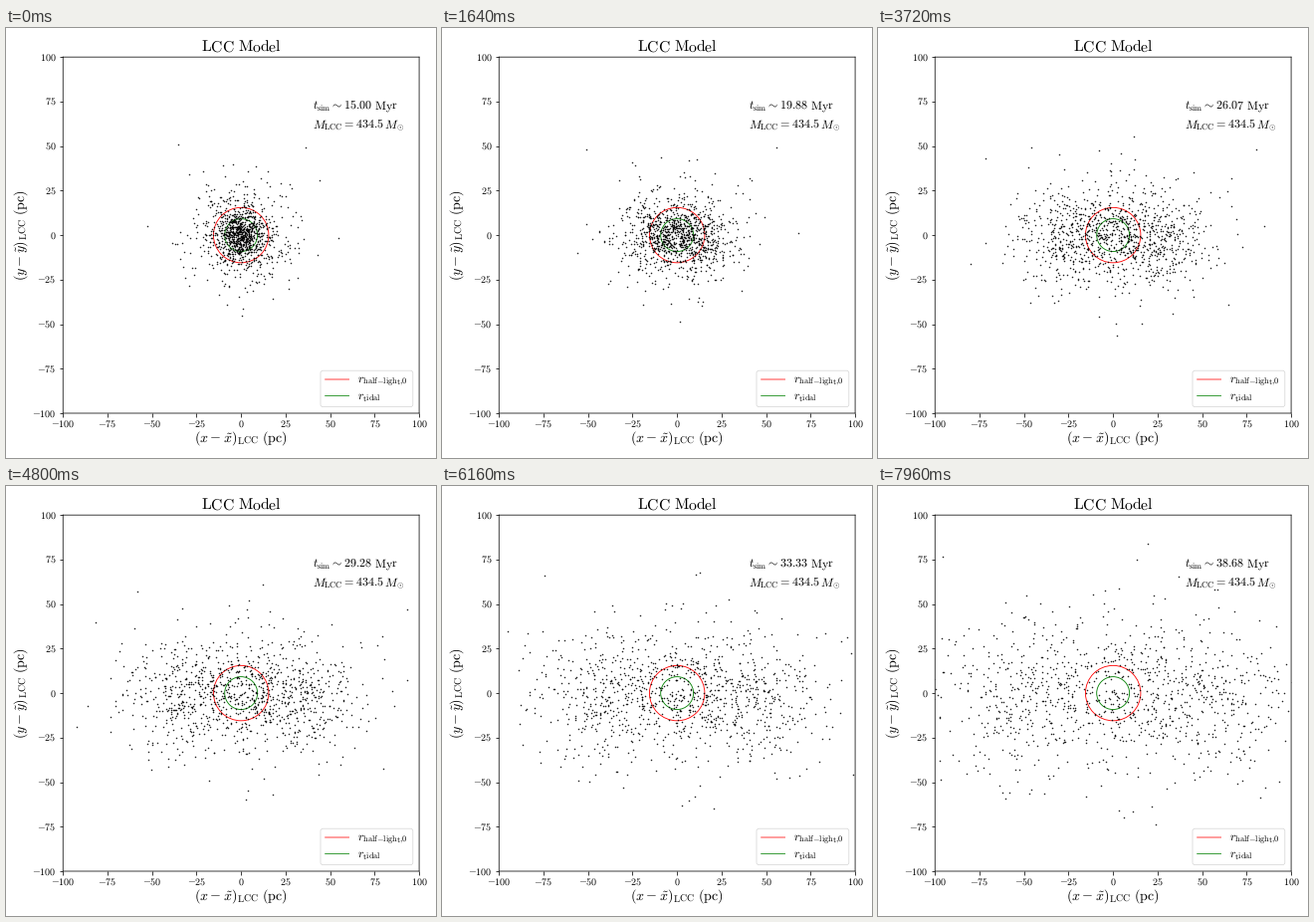
A matplotlib script for the animation above (8000 ms loop, 432 px wide and 432 px high).

```python
import numpy as np
import matplotlib as mpl
import matplotlib.pyplot as plt
from matplotlib.animation import FuncAnimation
from matplotlib.patches import Circle, FancyBboxPatch
from matplotlib.transforms import Affine2D

mpl.rcParams["mathtext.fontset"] = "cm"
mpl.rcParams["text.hinting"] = "none"

SIZE, DPI = 432, 72
FRAMES, INTERVAL = 200, 40
T0, DT = 15.0, 0.119          # Myr
KAPPA = 0.03                  # vertical frequency, 1/Myr
LEFT, TOP, SIDE = 57.24, 29.16, 357.84
MID_X, MID_Y = LEFT + SIDE / 2, TOP + SIDE / 2
HAIR = 0.75                   # thin line width

fig = plt.figure(figsize=(SIZE / DPI, SIZE / DPI), dpi=DPI, facecolor="white")
ax = fig.add_axes([LEFT / SIZE, 1 - (TOP + SIDE) / SIZE,
                   SIDE / SIZE, SIDE / SIZE])
ax.set(xlim=(-100, 100), ylim=(-100, 100))
# Pixel coordinates with y pointing down
px = Affine2D().scale(1 / SIZE, -1 / SIZE).translate(0, 1) + fig.transFigure


def label(x, y, s, size, **kw):
    return ax.text(x, y, f"${s}$", fontsize=size, transform=px,
                   va="baseline", zorder=6, **kw)


def draw_axes():
    ticks = np.arange(-100, 101, 25)
    ax.set_xticks(ticks, [""] * len(ticks))
    ax.set_yticks(ticks, [""] * len(ticks))
    ax.tick_params(width=HAIR)
    for line in [*ax.get_xticklines(), *ax.get_yticklines()]:
        line.set_snap(False)
    for spine in ax.spines.values():
        spine.set(linewidth=HAIR, snap=False)
    for v in ticks:
        shift = v / 200 * SIDE
        label(MID_X + shift, 400.6, v, 10, ha="center")
        label(50.2, MID_Y - shift + 3.3, v, 10, ha="right")
    label(MID_X, 23.8, r"\mathrm{LCC\ Model}", 15.7, ha="center")
    axis = r"(%s-\tilde{%s})_{\mathrm{LCC}}\ \mathrm{(pc)}"
    label(MID_X, 415.7, axis % ("x", "x"), 14, ha="center")
    label(18.7, MID_Y, axis % ("y", "y"), 14, ha="center",
          rotation=90, rotation_mode="anchor")


def draw_legend():
    ax.add_patch(FancyBboxPatch(
        (318.4, 346.6), 88, 31.6, boxstyle="round,pad=2.4,rounding_size=2.4",
        fc="white", ec="0.8", lw=HAIR, alpha=0.8, transform=px, zorder=5))
    rows = [(353, "r", r"r_{\mathrm{half}{-}\mathrm{light}{,}0}"),
            (369.6, "g", r"r_{\mathrm{tidal}}")]
    for y, color, name in rows:
        ax.plot([320.6, 344.6], [y, y], color=color, lw=HAIR, snap=False,
                transform=px, zorder=6)
        label(353.4, y + 3, name, 12)


def make_stars(n=1080, n_far=8, seed=7):
    """Plummer-like cluster with a few far members, spreading faster along x."""
    rng = np.random.default_rng(seed)
    u = rng.uniform(0, 0.93, n)
    r = np.append(11.5 * np.sqrt(u / (1 - u)), rng.uniform(44, 62, n_far))
    phi = rng.uniform(0, 2 * np.pi, r.size)
    x, y = r * np.cos(phi), r * np.sin(phi)
    vx = 0.03 * x + 4.5 * (2 * rng.beta(2, 2, r.size) - 1)
    vy = rng.normal(0, 1.05, r.size)
    return x, y, vx, vy


draw_axes()
draw_legend()
for radius, color in ((15.5, "r"), (9.2, "g")):
    ax.add_patch(Circle((0, 0), radius, fill=False, ec=color, lw=0.85, zorder=1))

x0, y0, vx, vy = make_stars()
stars, = ax.plot([], [], "k.", ms=1, zorder=2)
clock = label(307.6, 82, "", 12)
label(307.6, 99.8, r"M_{\mathrm{LCC}}=434.5\,M_{\odot}", 12)


def update(i):
    t = i * DT
    stars.set_data(x0 + vx * t,
                   y0 * np.cos(KAPPA * t) + vy * np.sin(KAPPA * t) / KAPPA)
    clock.set_text(rf"$t_{{\mathrm{{sim}}}}\sim {T0 + t:.2f}\ \mathrm{{Myr}}$")
    return stars, clock


anim = FuncAnimation(fig, update, frames=FRAMES, interval=INTERVAL,
                     init_func=lambda: update(0), repeat=True, repeat_delay=0)
plt.show()
```
